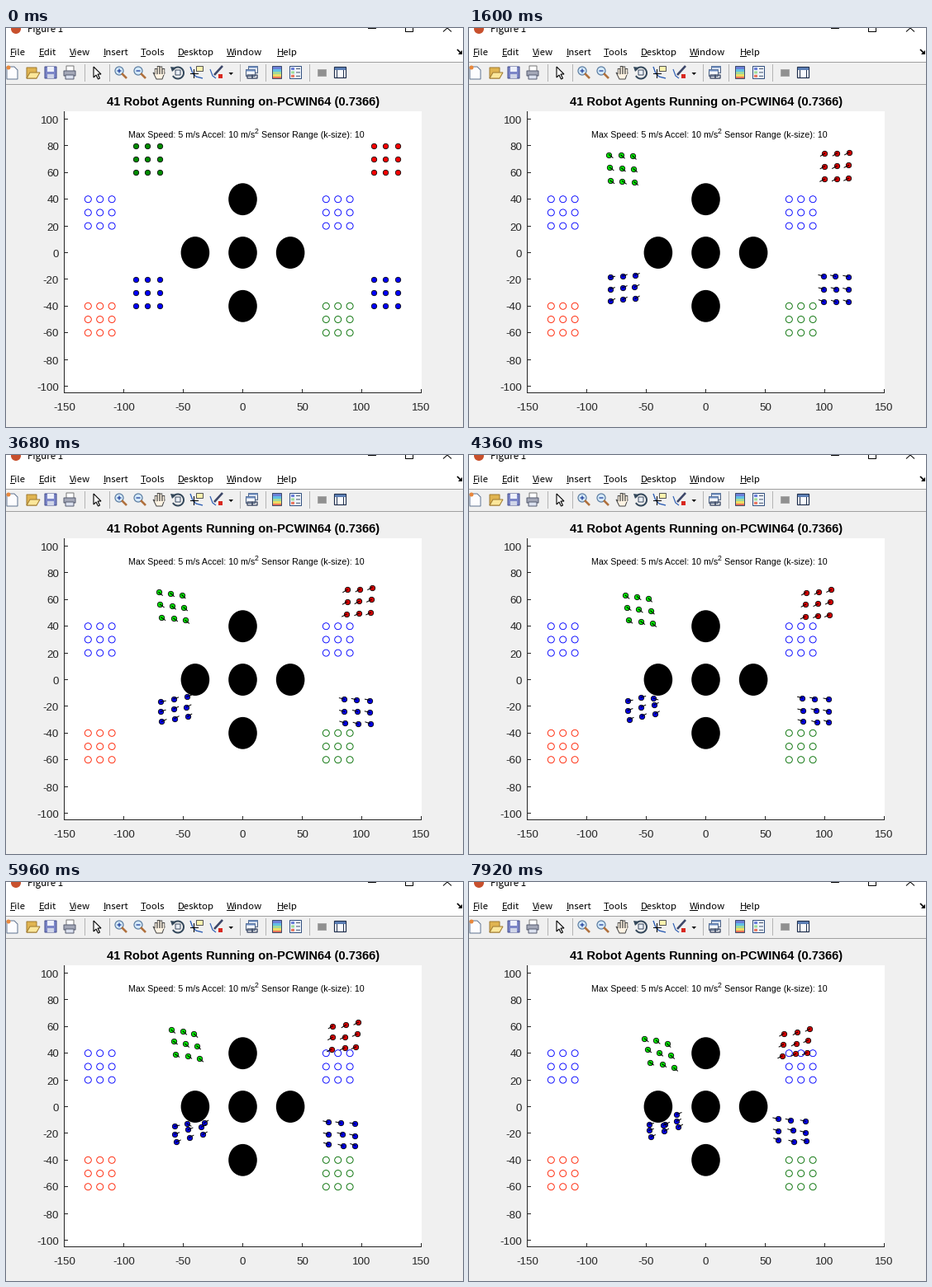
A matplotlib script that plays this animation: 553 px wide and 484 px high, repeating every 8 s.

```python
import numpy as np
import matplotlib.pyplot as plt
from matplotlib.animation import FuncAnimation
from matplotlib.patches import Arc, Ellipse, Polygon, Rectangle

W, H, DPI = 553, 484, 100
PT = 72 / DPI
STEP, LOOP = 80, 8000
INK = "#262626"
MENU_FONT = "Noto Sans CJK JP"
SCALE = np.array([1.44, -1.62])
ORIGIN = np.array([286.5, 272.5])
RADIUS = 12 * np.abs(SCALE)
CELLS = np.array([(c, r) for r in (-1, 0, 1) for c in (-1, 0, 1)], float)

rng = np.random.default_rng(4)
plt.rcParams["path.snap"] = False
fig = plt.figure(figsize=(W / DPI, H / DPI), dpi=DPI, facecolor="#f0f0f0")
ax = fig.add_axes([0, 0, 1, 1])
ax.set_xlim(0, W)
ax.set_ylim(H, 0)
ax.axis("off")


def box(x, y, w, h, fc="none", ec="none", lw=1):
    ax.add_patch(Rectangle((x, y), w, h, fc=fc, ec=ec, lw=lw * PT))


def poly(points, fc, ec="none", lw=1):
    ax.add_patch(Polygon(points, fc=fc, ec=ec, lw=lw * PT))


def oval(x, y, rx, ry, fc="none", ec="none", lw=1):
    ax.add_patch(Ellipse((x, y), 2 * rx, 2 * ry, fc=fc, ec=ec, lw=lw * PT))


def line(xs, ys, color="black", lw=1):
    ax.plot(xs, ys, color=color, lw=lw * PT, solid_capstyle="butt")


def text(x, y, s, size, font="Liberation Sans", color="black", **kw):
    ax.text(x, y, s, fontsize=size * PT, family=font, color=color, va="baseline", **kw)


def px(x, y):
    """Plot units to stage pixels."""
    return ORIGIN + SCALE * (x, y)


OBSTACLES = [px(x, y) for x, y in ((0, 0), (0, 40), (0, -40), (40, 0), (-40, 0))]


def title_bar():
    box(0, 0, W, 41, "white")
    oval(12, 1, 6, 6, "#c8502d")
    text(26, 5.5, "Figure 1", 11.6, MENU_FONT)
    line([438, 448], [0.5, 0.5])
    line([483.5, 483.5, 492.5, 492.5], [0, 4.5, 4.5, 0])
    for side in (-1, 1):
        line([534 + 5 * side, 534], [4.5, 0])
    for word, x, w in (("File", 5, 6), ("Edit", 40, 6), ("View", 77, 7), ("Insert", 118, 3),
                       ("Tools", 163, 6), ("Desktop", 208, 8), ("Window", 267, 10),
                       ("Help", 328, 8)):
        text(x, 33, word, 11.4, MENU_FONT)
        line([x, x + w], [34.5, 34.5])
    line([546, 551], [26, 31], lw=1.6)
    poly([(552, 27), (552, 32), (547, 32)], "black")


def magnifier(x, plus):
    line([x + 3, x + 9], [55, 61], "#b0703c", 2.6)
    oval(x, 52, 5, 5, "#d5eafa", "#5a7ca0", 1.2)
    line([x - 2.5, x + 2.5], [52, 52], "#1f3f9a", 1.3)
    if plus:
        line([x, x], [49.5, 54.5], "#1f3f9a", 1.3)


def toolbar():
    for y in (41.5, 68.5):
        line([0, W], [y, y], "#a0a0a0")
    for x in (95.5, 125.5, 283.5, 314.5, 367.5):
        line([x, x], [44, 65], "#b4b4b4")
    # new, open, save, print
    poly([(1, 47), (10, 47), (14, 51), (14, 62), (1, 62)], "#fdfdff", "#5f7390")
    oval(3, 48, 2.5, 2.5, "#e8873c")
    poly([(25, 61), (25, 48), (37, 48), (37, 61)], "#e0b450", "#a07a30")
    poly([(25, 61), (29, 54), (41, 54), (37, 61)], "#fbe79b", "#a07a30")
    box(47, 47, 14, 14, "#7c86c8", "#414c8c")
    box(50, 47, 8, 6, "#eef1fb")
    box(50, 56, 8, 5, "#d0d5e8")
    box(73, 46, 9, 7, "white", "#777777")
    box(70, 52, 14, 6, "#a4a8b8", "#555b70")
    box(72, 57, 10, 5, "#dce2f0", "#555b70")
    # pointer, zoom
    poly([(106, 47), (106, 60), (109, 57), (111.5, 62), (113.5, 61), (111, 56), (115, 56)],
         "white", "black", 1.1)
    magnifier(137, True)
    magnifier(160, False)
    # hand
    for i, top in enumerate((49, 46, 46.5, 49)):
        line([181.5 + 3 * i] * 2, [top, 56], "#444444", 3.4)
        line([181.5 + 3 * i] * 2, [top + 1, 57], "#fff4e4", 1.8)
    poly([(178, 54), (181, 56), (192, 54), (189, 62), (182, 62)], "#fff4e4", "#444444")
    # rotate
    ax.add_patch(Arc((208, 54.5), 14, 14, theta1=-150, theta2=150, ec="#33475a", lw=2 * PT))
    poly([(199, 47), (206, 48), (201, 53)], "#33475a")
    box(205, 51, 6, 6, "#e9eef5", "#3a4a60")
    # data cursor
    line([223, 226, 230, 238], [47, 55, 59, 61], "#2f5fb4", 1.4)
    line([223, 233], [55.5, 55.5])
    line([227.5, 227.5], [50, 61])
    box(230.5, 46.5, 8, 6, "#fdf3ae", "#555555")
    # brush
    line([247, 250, 254], [50, 58, 61], "#2f5fb4", 1.2)
    line([252, 262], [57, 46], "#3c4668", 2.6)
    box(257, 56, 5, 5, "#d8281e")
    poly([(269.5, 54), (275, 54), (272.2, 57)], "black")
    # linked plot
    for x, y in ((293.5, 46.5), (290.5, 50.5)):
        box(x, y, 11, 8, "#f4f7fc", "#4b5f80")
        box(x, y, 11, 2, "#6d8dc0")
    for x in (292, 298):
        box(x, 57, 6, 4, "none", "#44506a", 1.4)
    # colour bar, legend
    box(343.5, 46.5, 14, 15, "#eef4fd", "#34507e")
    for i, c in enumerate(("#6b80d8", "#62bfe6", "#9fdc9a", "#f0dc62", "#e8735a")):
        box(323, 47 + 3 * i, 10, 3, c)
        if i % 2 == 0:
            box(345, 48 + 2.2 * i, 4, 3, c)
            line([351, 356], [49.5 + 2.2 * i] * 2, "#46546c")
    box(322.5, 46.5, 11, 15, "none", "#3b4a68")
    # hide and show tools
    box(377.5, 50.5, 10, 8, "#909090", "#a4a4a4")
    box(397.5, 47.5, 14, 13, "#f8fafd", "#22314e", 1.2)
    box(398, 48, 13, 3, "#5a7db4")
    for x in (400.5, 408.5):
        line([x, x], [51, 60], "#22314e")


def chart():
    box(70, 101, 433, 342, "white")
    line([70.5, 70.5], [101, 443], INK)
    line([70, 503], [442.5, 442.5], INK)
    for v in range(-150, 151, 50):
        x = px(v, 0)[0]
        line([x, x], [438, 442], INK)
        text(x, 463.5, str(v), 13.33, color=INK, ha="center")
    for v in range(-100, 101, 20):
        y = int(px(0, v)[1]) + 0.5
        line([71, 75], [y, y], INK)
        text(64, y + 5, str(v), 13.33, color=INK, ha="right")
    text(287, 94, "41 Robot Agents Running on-PCWIN64 (0.7366)", 14.67,
         weight="bold", ha="center")
    text(148, 133, "Max Speed: 5 m/s Accel: 10 m/s", 10.67)
    text(301, 128.5, "2", 8.6)
    text(309, 133, "Sensor Range (k-size): 10", 10.67)
    for spot in OBSTACLES:
        oval(*spot, *RADIUS, "black")
    for x, y, c in ((-120, 30, "#0000ff"), (80, 30, "#0000ff"),
                    (-120, -50, "#ff2000"), (80, -50, "#006e00")):
        for cell in CELLS:
            oval(*px(*(cell * 10 + (x, y))), 4, 4, ec=c, lw=0.9)


class Swarm:
    """A 3x3 grid that drifts, shears a little and slides around obstacles."""

    def __init__(self, home, goal, across, down, idle, color):
        self.start = px(*home) + CELLS * np.abs(SCALE) * 10
        self.goal = goal + CELLS @ np.array([across, down])
        self.goal += rng.uniform(-1.2, 1.2, (9, 2))
        self.idle, self.color = idle, color
        self.dots, = ax.plot([], [], "o", mec="black", mew=0.8 * PT, ms=6.4 * PT, zorder=5)
        self.nose, = ax.plot([], [], color="black", lw=PT, zorder=6)

    def at(self, t):
        u = t / LOOP
        u += 0.15 * u * (1 - u)
        p = self.start + (self.goal - self.start) * u
        for spot in OBSTACLES:
            d = (p - spot) / RADIUS
            gap = np.hypot(*d.T)[:, None]
            p = spot + d * RADIUS * np.maximum(1, 1.2 / gap)
        return p

    def show(self, t):
        p = self.at(t)
        self.dots.set_data(*p.T)
        self.dots.set_markerfacecolor(self.color if t else self.idle)
        v = p - self.at(t - STEP)
        v *= (6 if t else 0) / np.hypot(*v.T)[:, None]
        path = np.stack([p, p + v, np.full_like(p, np.nan)], axis=1).reshape(-1, 2)
        self.nose.set_data(*path.T)


title_bar()
toolbar()
chart()

swarms = [
    Swarm((-80, 70), (229.5, 207.5), (14, 3.3), (3.7, 14), "#008c00", "#00e600"),
    Swarm((120, 70), (395, 195), (15.2, -2.3), (-1.3, 13.5), "#ff0000", "#d20000"),
    Swarm((-80, -30), (235.5, 295), (16.7, -6.2), (0.7, 8), "#0000ff", "#0000e0"),
    Swarm((120, -30), (390, 301.5), (16.5, 1.2), (1.2, 12.5), "#0000ff", "#0000e0"),
]


def update(n):
    for s in swarms:
        s.show(n * STEP)
    return [a for s in swarms for a in (s.dots, s.nose)]


anim = FuncAnimation(fig, update, frames=LOOP // STEP, interval=STEP,
                     init_func=lambda: update(0), repeat=True, repeat_delay=0, blit=False)
plt.show()
```
